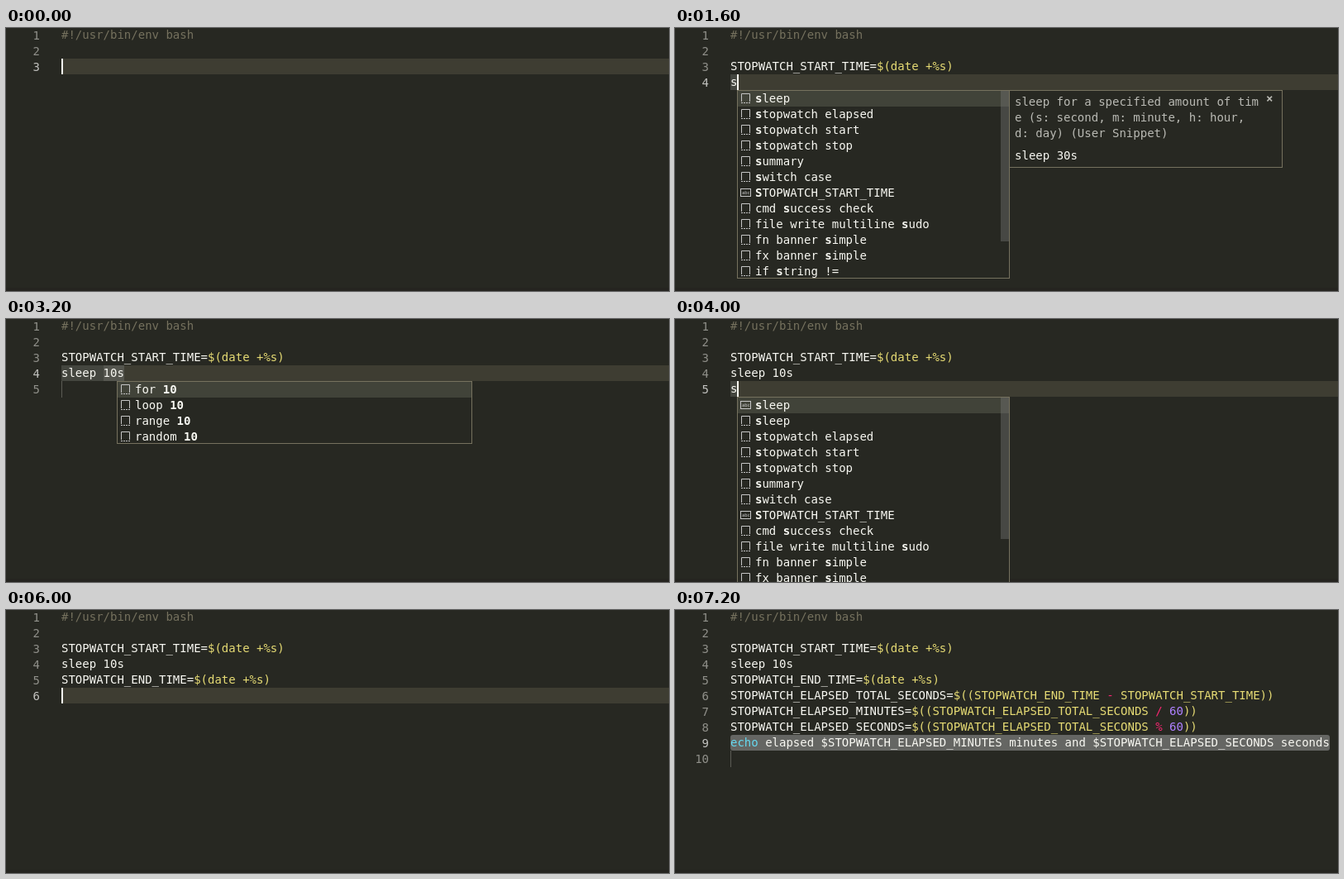
An HTML page that plays this animation: 802x318 px, repeating every 7600 ms.

```html
<!DOCTYPE html>
<html lang="en">
<head>
<meta charset="utf-8">
<title>Shell snippets</title>
<style>
html, body { margin: 0; width: 100%; height: 100%; overflow: hidden; background: #272822; }
svg { display: block; }
text { font: 14px "DejaVu Sans Mono", monospace; white-space: pre; fill: #f8f8f2; }
.b { font-weight: bold; }
</style>
</head>
<body>
<svg id="stage" width="802" height="318" viewBox="0 0 802 318"></svg>
<script>
const STEP = 400, ROW = 19, CHAR = 8.428, LEFT = 67;
const C = {
  bg: '#272822', line: '#3e3d32', text: '#f8f8f2', comment: '#75715e', string: '#e6db74',
  number: '#ae81ff', op: '#f92672', fn: '#66d9ef', border: '#75715e', focus: '#414339',
  word: '#44463f', slot: '#55564f', select: '#656663', icon: '#c5c5c5'
};
const stage = document.getElementById('stage');

const colX = n => LEFT + Math.round(n * CHAR);
const rowY = n => (n - 1) * ROW - 1;
const esc = s => s.replace(/&/g, '&amp;').replace(/</g, '&lt;');
const rect = (x, y, w, h, fill, extra = '') =>
  `<rect x="${x}" y="${y}" width="${w}" height="${h}" fill="${fill}" ${extra}/>`;
const frame = (x, y, w, h) =>
  rect(x + .5, y + .5, w - 1, h - 1, C.bg, `stroke="${C.border}"`);
const text = (x, y, inner, attrs = '') => `<text x="${x}" y="${y}" ${attrs}>${inner}</text>`;
const spans = parts => parts.map(([s, c]) => `<tspan fill="${c}">${esc(s)}</tspan>`).join('');

// Splits a shell line into [text, colour] parts.
function tokens(line) {
  if (line[0] === '#') return [[line, C.comment]];
  if (line.startsWith('echo')) return [['echo', C.fn], [line.slice(4), C.text]];
  const at = line.indexOf('=$(');
  if (at < 0) return [[line, C.text]];
  const parts = line.slice(at + 1).split(/( [-\/%](?= )|\d+)/).map(s =>
    [s, /^\d/.test(s) ? C.number : /^ [-\/%]$/.test(s) ? C.op : C.string]);
  return [[line.slice(0, at + 1), C.text], ...parts];
}

// Breaks coloured parts into rows of at most n characters.
function wrap(parts, n) {
  const chars = parts.flatMap(([s, c]) => [...s].map(ch => [ch, c]));
  const rows = [];
  for (let i = 0; i < chars.length; i += n) rows.push(chars.slice(i, i + n));
  return rows;
}

const SHEBANG = '#!/usr/bin/env bash';
const START = 'STOPWATCH_START_TIME=$(date +%s)';
const END = 'STOPWATCH_END_TIME=$(date +%s)';
const ELAPSED = [
  'STOPWATCH_ELAPSED_TOTAL_SECONDS=$((STOPWATCH_END_TIME - STOPWATCH_START_TIME))',
  'STOPWATCH_ELAPSED_MINUTES=$((STOPWATCH_ELAPSED_TOTAL_SECONDS / 60))',
  'STOPWATCH_ELAPSED_SECONDS=$((STOPWATCH_ELAPSED_TOTAL_SECONDS % 60))',
  'echo elapsed $STOPWATCH_ELAPSED_MINUTES minutes and $STOPWATCH_ELAPSED_SECONDS seconds'
];

const DOCS = {
  sleep: {
    about: ['sleep for a specified amount of tim', 'e (s: second, m: minute, h: hour, ', 'd: day) (User Snippet)'],
    code: ['sleep 30s'], h: 94
  },
  start: { about: ['start stopwatch (User Snippet)'], code: [START], h: 56 },
  stop: { about: ['stop stopwatch (User Snippet)'], code: [END], h: 56 },
  elapsed: { about: ['elapsed time (User Snippet)'], code: ELAPSED, h: 208 }
};

// A leading "@" marks a plain word instead of a snippet.
const WATCH = ['stopwatch elapsed', 'stopwatch start', 'stopwatch stop'];
const TAIL = ['cmd success check', 'file write multiline sudo', 'fn banner simple', 'fx banner simple',
  'if string !=', 'if string =', 'if string empty', 'if string not empty'];
const listS = (words, first = []) => [...first, 'sleep', ...WATCH, 'summary', 'switch case', ...words, ...TAIL];
const listSt = words => [...WATCH, ...words, 'switch case', ...TAIL.slice(4)];
const W_START = '@STOPWATCH_START_TIME', W_END = '@STOPWATCH_END_TIME';
const TENS = ['for 1 to 10', 'loop 1 to 10', 'range 1 to 10', 'random 1 to 10'].map(s => s.replace('1 to ', ''));

const L3 = [SHEBANG, '', START];
const L4 = [...L3, 'sleep 10s'];
const L5 = [...L4, END];
const pop = (query, items, docs, sel = 0, w = 330) => ({ query, items, docs, sel, w });

// One scene per step; "at" is the cursor as [row, column].
const scenes = [
  { lines: [SHEBANG, '', ''], at: [3, 0] },
  { lines: [SHEBANG, '', 's'], at: [3, 1], pop: pop('s', listS([]), 'sleep') },
  { lines: [SHEBANG, '', 's'], at: [3, 1], off: true, pop: pop('s', listS([]), 'start', 2) },
  { lines: [...L3, ''], at: [4, 0] },
  { lines: [...L3, 's'], at: [4, 1], pop: pop('s', listS([W_START]), 'sleep') },
  { lines: [...L3, 'sleep 30s', ''], at: [4, 8], slot: [6, 9], select: [6, 8], stop: 5 },
  { lines: [...L3, 'sleep 1s', ''], at: [4, 7], slot: [6, 8], word: [0, 6], stop: 5 },
  { lines: [...L4, ''], at: [4, 8], slot: [6, 9], word: [0, 6], stop: 5 },
  { lines: [...L4, ''], at: [4, 8], slot: [6, 9], word: [0, 6], stop: 5, off: true, pop: pop('10', TENS, null, 0, 430) },
  { lines: [...L4, ''], at: [5, 0] },
  { lines: [...L4, 's'], at: [5, 1], pop: pop('s', listS([W_START], ['@sleep']), null) },
  { lines: [...L4, 'st'], at: [5, 2], pop: pop('st', listSt([W_START]), 'elapsed') },
  { lines: [...L4, 'st'], at: [5, 2], off: true, pop: pop('st', listSt([W_START]), 'stop', 2) },
  { lines: [...L4, 'st'], at: [5, 2], pop: pop('st', listSt([W_START]), 'stop', 2) },
  { lines: L5, at: [5, END.length] },
  { lines: [...L5, ''], at: [6, 0] },
  { lines: [...L5, 's'], at: [6, 1], pop: pop('s', listS([W_END, W_START], ['@sleep']), null, 0, 430) },
  { lines: [...L5, 'st'], at: [6, 2], pop: pop('st', listSt([W_END, W_START]), 'elapsed') },
  { lines: [...L5, ...ELAPSED, ''], at: [9, 0], select: [0, ELAPSED[3].length], stop: 10, off: true }
];

// Sets the matched letters of a label in bold.
function label(s, query) {
  const run = s.search(new RegExp('\\b' + query, 'i'));
  const hits = new Set();
  let from = 0;
  [...query].forEach((ch, i) => {
    const k = run >= 0 ? run + i : s.toLowerCase().indexOf(ch, from);
    hits.add(k);
    from = k + 1;
  });
  return [...s].map((ch, i) => hits.has(i) ? `<tspan class="b">${ch}</tspan>` : esc(ch)).join('');
}

function icon(x, y, isWord) {
  if (isWord) {
    return rect(x + 4.5, y + 5.5, 12, 9, 'none', `stroke="${C.icon}"`) +
      text(x + 6, y + 12, 'abc', `style="font-size:5.5px;fill:${C.icon}"`);
  }
  return `<path d="M${x + 5.5} ${y + 14}V${y + 4.5}H${x + 15.5}V${y + 14}" fill="none" stroke="${C.icon}"/>` +
    `<path d="M${x + 5} ${y + 15.5}h12" stroke="${C.icon}" stroke-dasharray="2 1"/>`;
}

function drawDocs(x, y, doc) {
  let out = frame(x, y, 331, doc.h), base = y + 19;
  doc.about.forEach((s, i) => out += text(x + 7, base + i * ROW, s, 'opacity=".7"'));
  out += text(x + 311, y + 15, '×', 'class="b" opacity=".7"');
  base += doc.about.length * ROW + 8;
  for (const row of doc.code.flatMap(s => wrap(tokens(s), 37))) {
    if (base < y + doc.h) out += text(x + 7, base, spans(row));
    base += ROW;
  }
  return out;
}

function drawPopup(p, x, y) {
  const total = p.items.length, shown = Math.min(12, total), h = shown * ROW;
  let out = frame(x, y, p.w, h);
  out += rect(x + 1, y + 1 + p.sel * ROW, p.w - 2, ROW, C.focus);
  p.items.slice(0, shown).forEach((item, i) => {
    const isWord = item[0] === '@', top = y + i * ROW;
    out += icon(x, top, isWord) + text(x + 22, top + 15, label(item.replace('@', ''), p.query));
  });
  if (total > shown) out += rect(x + p.w - 11, y + 1, 10, Math.round(h * shown / total), '#797979', 'opacity=".4"');
  out += rect(x + .5, y + .5, p.w - 1, h - 1, 'none', `stroke="${C.border}"`);
  return p.docs ? out + drawDocs(x + p.w - 1, y, DOCS[p.docs]) : out;
}

function draw(s) {
  const [row, col] = s.at, top = rowY(row);
  const band = ([a, b], fill, extra) => rect(colX(a), top, colX(b) - colX(a), ROW, fill, extra);
  let out = rect(0, 0, 802, 318, C.bg) + rect(0, 314, 802, 4, '#252420');
  if (!s.select) out += rect(LEFT, top, 735, ROW, C.line);
  const word = s.word || (s.pop && !s.slot && [0, col]);
  if (word) out += band(word, C.word);
  if (s.slot) out += band(s.slot, C.slot);
  if (s.select) out += band(s.select, C.select, 'rx="3"');
  if (s.stop) out += rect(LEFT, rowY(s.stop), 1, 20, '#5b5b54');
  s.lines.forEach((line, i) => {
    const y = rowY(i + 1);
    out += text(41, y + 15, i + 1, `text-anchor="end" style="fill:${i + 1 === row ? '#c2c2bf' : '#90908a'}"`);
    out += text(LEFT, y + 14, spans(tokens(line)));
  });
  if (!s.off) out += rect(colX(col), top, 2, ROW, '#f8f8f0');
  if (s.pop) out += drawPopup(s.pop, colX(col), top + ROW);
  stage.innerHTML = out;
}

let current = -1;
const begin = performance.now();
function tick() {
  const next = Math.floor((performance.now() - begin) / STEP) % scenes.length;
  if (next !== current) draw(scenes[current = next]);
  requestAnimationFrame(tick);
}
tick();
</script>
</body>
</html>
```
